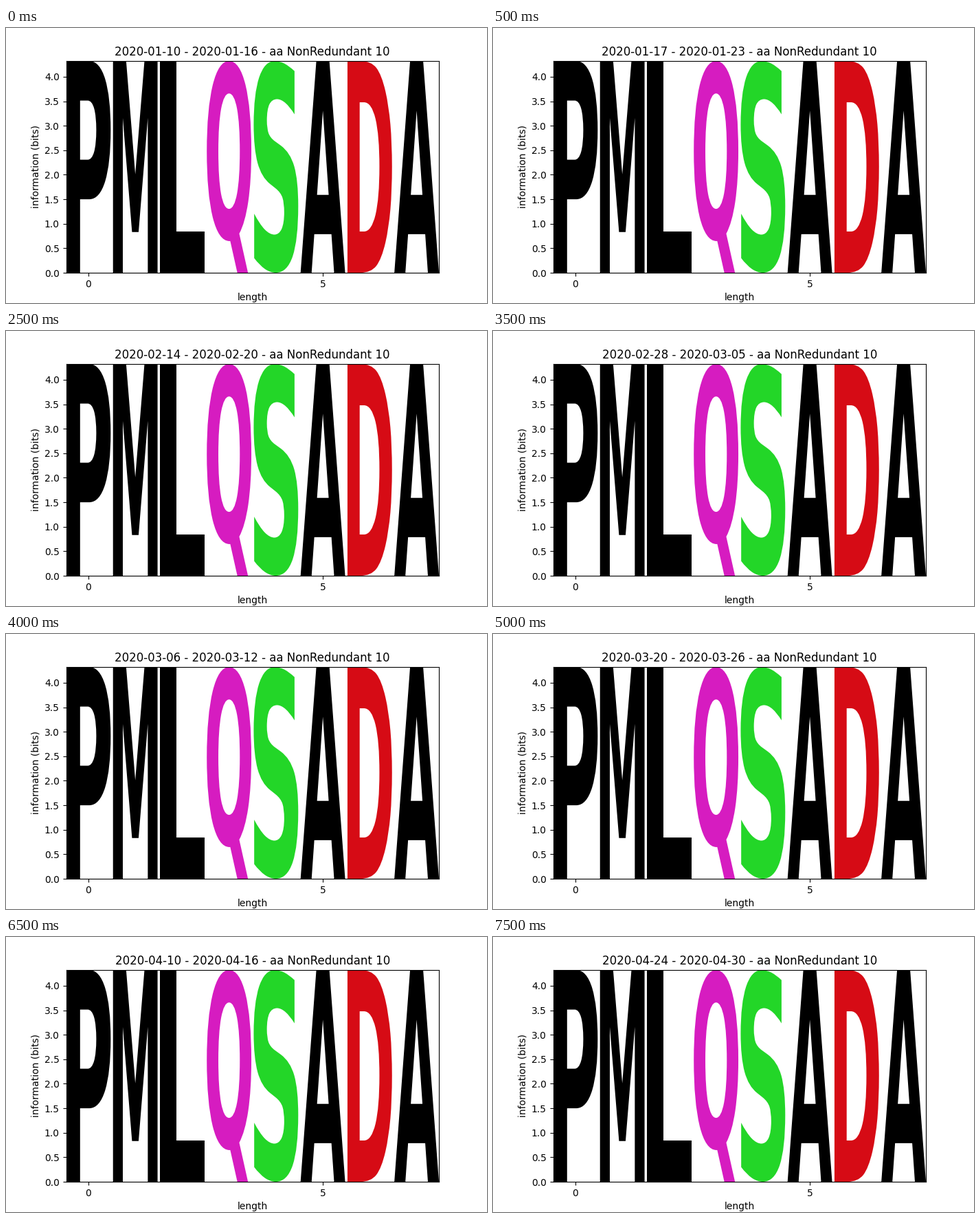
Recreate the animation shown at these times as a matplotlib script. Size 700 px wide and 400 px high, loop 8000 ms.

```python
import numpy as np
import matplotlib.pyplot as plt
from matplotlib.animation import FuncAnimation
from matplotlib.patches import PathPatch
from matplotlib.textpath import TextPath
from matplotlib.transforms import Bbox, BboxTransformFrom, BboxTransformTo

SEQUENCE = "PMLQSADA"
COLORS = {"Q": "#d61cc0", "S": "#23d628", "D": "#d60b15"}
BITS = np.log2(20)
HALF = 0.475
WEEKS = 16
FIRST_DAY = np.datetime64("2020-01-10")

plt.rcParams["font.family"] = "DejaVu Sans"


def draw_letter(ax, char, pos):
    """Stretch a bold glyph to fill its column from zero to full height."""
    path = TextPath((0, 0), char, size=1,
                    prop={"family": "DejaVu Sans", "weight": "bold"})
    cell = Bbox.from_extents(pos - HALF, 0, pos + HALF, BITS)
    fit = BboxTransformFrom(path.get_extents()) + BboxTransformTo(cell)
    ax.add_patch(PathPatch(fit.transform_path(path), lw=0, zorder=0,
                           color=COLORS.get(char, "black")))


def week_title(week):
    start = FIRST_DAY + 7 * week
    return f"{start} - {start + 6} - aa NonRedundant 10"


fig, ax = plt.subplots(figsize=(7, 4), dpi=100)
for pos, char in enumerate(SEQUENCE):
    draw_letter(ax, char, pos)

ax.set_xlim(-HALF, len(SEQUENCE) - 1 + HALF)
ax.set_ylim(0, BITS)
ax.set_xticks([0, 5])
ax.set_yticks(np.arange(0, BITS, 0.5))
ax.set_xlabel("length")
ax.set_ylabel("information (bits)")
title = ax.set_title(week_title(0))


def update(week):
    title.set_text(week_title(week))
    return [title]


anim = FuncAnimation(fig, update, frames=WEEKS, interval=500,
                     init_func=lambda: update(0), repeat=True, repeat_delay=0)
plt.show()
```
